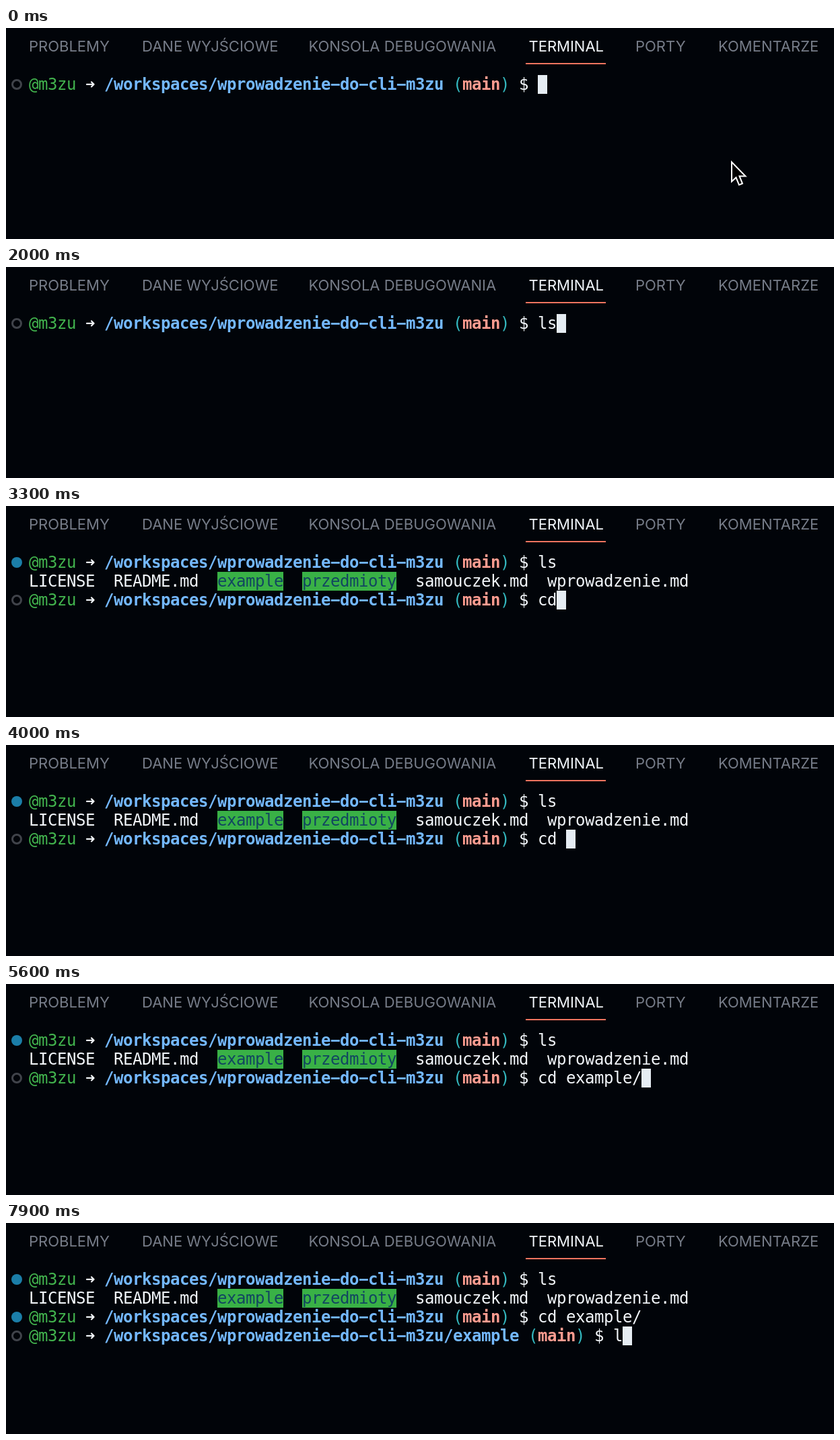
Recreate the animation shown at these times as an HTML page with a canvas. Size 1230 by 314 pixels, loop 8 s.

```html
<!DOCTYPE html>
<html lang="pl">
<head>
<meta charset="utf-8">
<title>Terminal</title>
<style>
  html, body { margin: 0; width: 100%; height: 100%; overflow: hidden; background: #010409; }
  canvas { display: block; }
</style>
</head>
<body>
<canvas width="1230" height="314"></canvas>
<script>
const ctx = document.querySelector('canvas').getContext('2d');

const LOOP = 8000, CELL = 14, ROW = 28, LEFT = 34, TOP = 70;
const MONO = '24px "DejaVu Sans Mono", monospace';
const SANS = '22px Inter, sans-serif';
const C = {
  back: '#010409', text: '#f2f6fa', dim: '#767c88', line: '#f6745f',
  user: '#42b44e', path: '#74b8ff', paren: '#34b9c0', branch: '#ff9c90',
  dirBack: '#39b146', dirText: '#124660', done: '#1b7ea8', open: '#40434a',
  caret: '#e6edf3'
};

const USER = 'm3zu';
const HOME = '/workspaces/wprowadzenie-do-cli-' + USER;
const TABS = [
  ['PROBLEMY', 34], ['DANE WYJŚCIOWE', 202], ['KONSOLA DEBUGOWANIA', 449.5],
  ['TERMINAL', 776.5], ['PORTY', 935], ['KOMENTARZE', 1058]
];
const LISTING = [
  ['LICENSE', 0], ['README.md', 9], ['example', 20, true],
  ['przedmioty', 29, true], ['samouczek.md', 41], ['wprowadzenie.md', 55]
];

// Each command: row, directory, [time, text typed so far], time of Enter
const COMMANDS = [
  { row: 0, dir: HOME, start: 0, keys: [[1100, 'l'], [1400, 'ls']], enter: 2300 },
  { row: 2, dir: HOME, start: 2300, enter: 6000,
    keys: [[2900, 'c'], [3100, 'cd'], [3500, 'cd '], [4900, 'cd e'], [5000, 'cd ex'], [5200, 'cd example/']] },
  { row: 3, dir: HOME + '/example', start: 6000, keys: [[7700, 'l']], enter: Infinity }
];
const FIRST_KEY = COMMANDS[0].keys[0][0];

const cellX = col => LEFT + col * CELL;
const rowY = row => TOP + row * ROW;

function box(x, y, w, h, color) {
  ctx.fillStyle = color;
  ctx.fillRect(x, y, w, h);
}

// Writes on the cell grid and returns the next free column
function write(text, col, row, color, bold) {
  ctx.font = (bold ? 'bold ' : '') + MONO;
  ctx.fillStyle = color;
  for (const ch of text) ctx.fillText(ch, cellX(col++), rowY(row) + 22);
  return col;
}

function drawTabs() {
  ctx.font = SANS;
  for (const [label, x] of TABS) {
    ctx.fillStyle = label === 'TERMINAL' ? C.text : C.dim;
    ctx.fillText(label, x, 35);
  }
  box(772, 52, 119, 2, C.line);
}

function drawMark(row, done) {
  ctx.beginPath();
  ctx.arc(16, rowY(row) + 14, done ? 8 : 6.5, 0, 2 * Math.PI);
  ctx.fillStyle = C.done;
  ctx.strokeStyle = C.open;
  ctx.lineWidth = 3;
  done ? ctx.fill() : ctx.stroke();
}

function drawCommand({ row, dir, start, keys, enter }, t) {
  if (t < start) return;
  const done = t >= enter;
  const typed = keys.filter(([at]) => t >= at).pop()?.[1] ?? '';
  drawMark(row, done);
  write('@' + USER, 0, row, C.user);
  write('➜', 6, row, C.text, true);
  // Wide dashes, as in the terminal typeface
  let col = write(dir.replaceAll('-', '\u2212'), 8, row, C.path, true) + 1;
  col = write('(', col, row, C.paren);
  col = write('main', col, row, C.branch, true);
  col = write(')', col, row, C.paren) + 1;
  col = write('$', col, row, C.text) + 1;
  col = write(typed, col, row, C.text);
  if (!done) box(cellX(col), rowY(row), CELL, ROW, C.caret);
}

function drawListing() {
  for (const [name, col, isDir] of LISTING) {
    if (isDir) box(cellX(col), rowY(1), name.length * CELL, ROW, C.dirBack);
    write(name, col, 1, isDir ? C.dirText : C.text);
  }
}

function drawPointer() {
  const arrow = new Path2D('M1078 199.5V228.5L1084.5 222.5L1089 233.5L1094 231.5L1089.5 220.5H1098.5Z');
  ctx.fillStyle = '#000';
  ctx.strokeStyle = '#fff';
  ctx.lineWidth = 2;
  ctx.fill(arrow);
  ctx.stroke(arrow);
}

function frame(now) {
  const t = now % LOOP;
  box(0, 0, 1230, 314, C.back);
  drawTabs();
  for (const command of COMMANDS) drawCommand(command, t);
  if (t >= COMMANDS[0].enter) drawListing();
  if (t < FIRST_KEY) drawPointer();
}

const begin = performance.now();
function tick() {
  frame(performance.now() - begin);
  requestAnimationFrame(tick);
}
tick();
</script>
</body>
</html>
```
